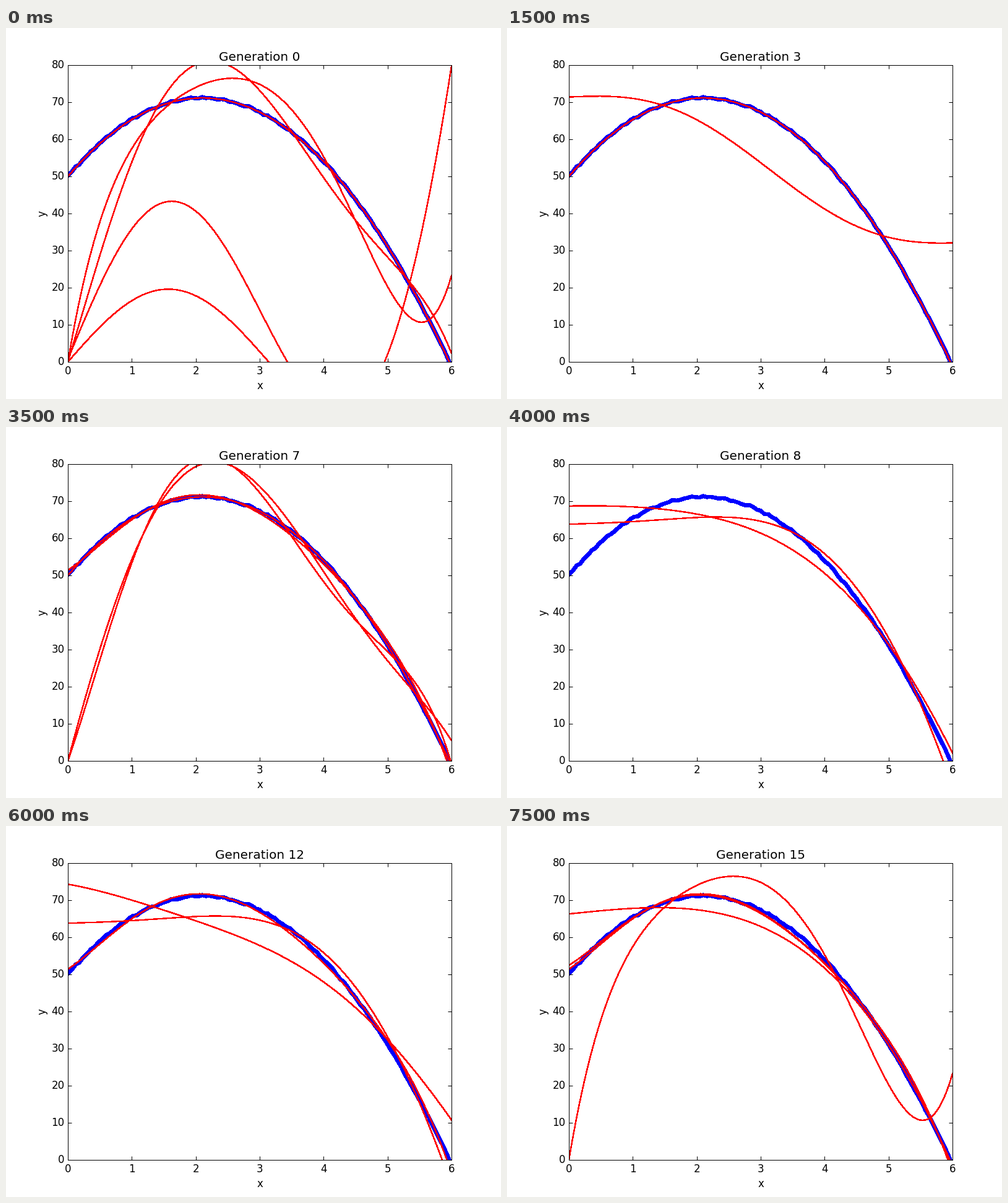
These frames come from a looping animation (800x600 px, 8000 ms). A matplotlib script:

```python
import numpy as np
import matplotlib.pyplot as plt
from matplotlib.animation import FuncAnimation

plt.rcParams.update({
    "font.family": "DejaVu Sans", "font.size": 12,
    "axes.linewidth": 0.72, "axes.titlesize": 14.4, "axes.titlepad": 5,
    "axes.labelpad": 5, "axes.axisbelow": False,
    "xtick.direction": "in", "ytick.direction": "in",
    "xtick.top": True, "ytick.right": True,
    "xtick.major.size": 4, "ytick.major.size": 4,
    "xtick.major.width": 0.72, "ytick.major.width": 0.72,
    "xtick.major.pad": 4, "ytick.major.pad": 4,
    "ytick.alignment": "center", "lines.antialiased": False,
})

x = np.linspace(0, 6, 301)
sin = np.sin(x)


def throw(t):
    """Height of the thrown ball."""
    return 50 + 20.08 * t - 4.77 * t ** 2


def through(*ys):
    """Polynomial passing through ys at x = 0, 1, ..., 6."""
    return np.polyval(np.polyfit(np.arange(7), ys, 6), x)


def mix(a, b, share):
    """Offspring of two candidates."""
    return (1 - share) * a + share * b


best = throw(x)
arch = 19.6 * sin
rebound = 40.6 * sin + 0.75 * np.exp(0.8 * x)
slide = 71.4 - 6.23 * x + 6.95 * sin
slope = 74.3 - 1.787 * x ** 2 - 2.97 * sin
shelf = 63.8 + 4.61 * x - 0.461 * x ** 3 - 4.1 * sin
dome = 66.3 + 2.31 * x - 0.379 * x ** 3 - 0.51 * sin
wave = through(0, 57.5, 74, 74.8, 55.3, 20.3, 23.3)
steep = through(0, 53.4, 81, 72.3, 48.3, 29.5, -0.8)
bent = through(0, 54.3, 79.3, 74, 51, 27, 5.5)
near = through(51.4, 65, 71.7, 66.7, 53, 32.3, -3.5)
middle = mix(steep, bent, 0.5)
nearer = mix(near, dome, 0.07)
low = mix(dome, slope, 0.3)

# Candidates alive in each generation
GENERATIONS = [
    (best, wave, middle, rebound, arch), (best, wave, middle), (best, wave),
    (best, slide), (best, bent), (best, slope), (best, slope, steep),
    (best, near, steep, bent), (low, shelf), (low, near), (slope, near),
    (slope, near, nearer), (slope, shelf, near), (near, shelf, dome),
    (near, dome, nearer), (wave, dome, nearer, near),
]

fig, ax = plt.subplots(figsize=(8, 6), dpi=100, facecolor="white")
fig.subplots_adjust(left=0.125, right=0.9, bottom=0.1, top=0.9)
ax.set(xlim=(0, 6), ylim=(0, 80), xlabel="x",
       xticks=range(7), yticks=range(0, 81, 10))
ax.set_ylabel("y", labelpad=4)
title = ax.set_title("Generation 0", y=1.0)

# Measured trajectory with small seeded errors
t = np.linspace(0, 6, 101)
noise = np.random.default_rng(4).uniform(-0.3, 0.3, t.size)
ax.plot(t, throw(t) + noise, color="blue", lw=4)
lines = [ax.plot([], [], color="red", lw=1)[0]
         for _ in range(max(map(len, GENERATIONS)))]


def update(gen):
    title.set_text(f"Generation {gen}")
    for line in lines:
        line.set_data([], [])
    for line, curve in zip(lines, GENERATIONS[gen]):
        line.set_data(x, curve)
    return [title, *lines]


anim = FuncAnimation(fig, update, frames=len(GENERATIONS), interval=500,
                     repeat=True, repeat_delay=0, blit=False)
plt.show()
```
